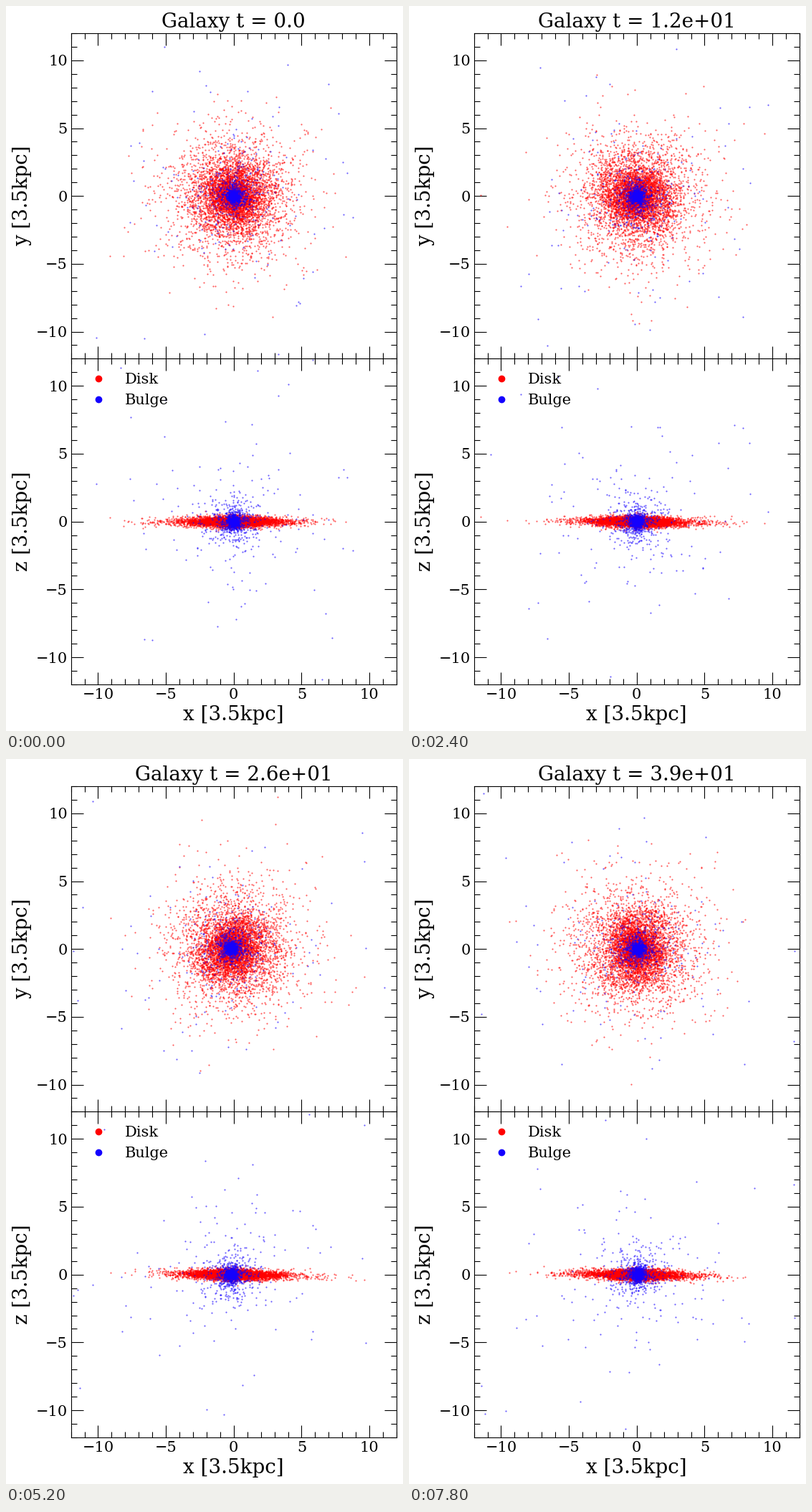
These frames come from a looping animation (554 by 1012 pixels, 8 s). A matplotlib script:

```python
import numpy as np
import matplotlib.pyplot as plt
from matplotlib.animation import FuncAnimation
from matplotlib.ticker import MultipleLocator

W, H, DPI = 554, 1012, 100
LEFT, RIGHT, TOP, MID, BOTTOM = 90.6, 545, 38, 492.4, 947
LIMIT = 12
FRAMES, INTERVAL = 40, 200
RED, BLUE = "#ff0000", "#1400ff"
N_DISK, N_BULGE = 5800, 1600

plt.rcParams.update({
    "font.family": "DejaVu Serif",
    "xtick.labelsize": 15,
    "ytick.labelsize": 15,
    "axes.labelsize": 20,
    "axes.titlesize": 20,
})

rng = np.random.default_rng(12)

# Exponential disk: radius, angle, height and epicycle of every star
disk_r = rng.gamma(2.0, 1.0, N_DISK)
disk_angle = rng.uniform(0, 2 * np.pi, N_DISK)
disk_z = 0.18 * rng.normal(size=N_DISK)
z_phase = rng.uniform(0, 2 * np.pi, N_DISK)
ecc = np.abs(0.12 * rng.normal(size=N_DISK))
epi_phase = rng.uniform(0, 2 * np.pi, N_DISK)
omega = 0.85 / np.sqrt(disk_r**2 + 0.3)
kappa = 1.45 * omega

# Hernquist bulge: every star runs on its own randomly tilted ellipse
root = np.sqrt(rng.uniform(0, 0.99, N_BULGE))
bulge_r = 1.1 * 0.2 * root / (1 - root)
axis_a = rng.normal(size=(N_BULGE, 3))
axis_a /= np.linalg.norm(axis_a, axis=1, keepdims=True)
axis_b = np.cross(axis_a, rng.normal(size=(N_BULGE, 3)))
axis_b /= np.linalg.norm(axis_b, axis=1, keepdims=True)
flat = rng.uniform(0.4, 1, N_BULGE)
bulge_phase = rng.uniform(0, 2 * np.pi, N_BULGE)
bulge_omega = 0.8 / (bulge_r + 0.3)


def sway(t):
    """Slow drift of the centre, growing from rest."""
    grow = min(t / 7, 1)
    swing = 2 * np.pi * (t - 7) / 19
    return -0.18 * grow * np.cos(swing), 0.08 * grow * np.cos(swing + 0.4)


def disk_at(t):
    grow = min(t / 8, 1)
    turn = kappa * t + epi_phase
    r = disk_r * (1 + ecc * np.cos(turn))
    angle = disk_angle + omega * t - 1.38 * ecc * np.sin(turn)
    # Two trailing spiral arms
    arm = 2 * (angle - 0.3 * t + 2 * np.log(disk_r + 0.3))
    strength = grow * np.exp(-((disk_r - 3.2) / 1.2) ** 2)
    angle = angle + 0.15 * strength * np.sin(arm)
    r = r * (1 + 0.07 * strength * np.cos(arm))
    cx, cy = sway(t)
    pull = np.exp(-disk_r / 1.5)
    x = r * np.cos(angle) + cx * pull
    y = r * np.sin(angle) + cy * pull
    z = disk_z * (1 + 0.25 * np.cos(0.6 * t + z_phase)) - 0.015 * grow * x
    return x, y, z


def bulge_at(t):
    turn = bulge_phase + bulge_omega * t
    x, y, z = (bulge_r[:, None] * (np.cos(turn)[:, None] * axis_a
               + (flat * np.sin(turn))[:, None] * axis_b)).T
    cx, cy = sway(t)
    return x + cx, y + cy, z


def panel(top, bottom):
    ax = fig.add_axes([LEFT / W, 1 - bottom / H,
                       (RIGHT - LEFT) / W, (bottom - top) / H])
    ax.set(xlim=(-LIMIT, LIMIT), ylim=(-LIMIT, LIMIT))
    for axis in (ax.xaxis, ax.yaxis):
        axis.set_major_locator(MultipleLocator(5))
        axis.set_minor_locator(MultipleLocator(1))
    ax.tick_params(which="both", direction="in", top=True, right=True, width=0.8)
    ax.tick_params(which="major", length=12)
    ax.tick_params(which="minor", length=6)
    return ax


def stars(ax, color):
    return ax.plot([], [], ".", ms=1, color=color, alpha=0.7)[0]


# The sliver keeps rounding from losing a pixel
fig = plt.figure(figsize=((W + 0.01) / DPI, (H + 0.01) / DPI), dpi=DPI,
                 facecolor="white")
face = panel(TOP, MID)
edge = panel(MID, BOTTOM)
face.tick_params(labelbottom=False)
face.set_ylabel("y [3.5kpc]")
edge.set_ylabel("z [3.5kpc]")
edge.set_xlabel("x [3.5kpc]")
title = face.set_title("")

disk_face, bulge_face = stars(face, RED), stars(face, BLUE)
disk_edge, bulge_edge = stars(edge, RED), stars(edge, BLUE)

for name, color, y in (("Disk", RED, 520.5), ("Bulge", BLUE, 549)):
    fig.add_artist(plt.Line2D([129 / W], [1 - y / H], marker="o", ms=6,
                              color=color, ls="none"))
    fig.text(166 / W, 1 - (y + 6.5) / H, name, fontsize=15, va="baseline")


def update(t):
    x, y, z = disk_at(t)
    disk_face.set_data(x, y)
    disk_edge.set_data(x, z)
    x, y, z = bulge_at(t)
    bulge_face.set_data(x, y)
    bulge_edge.set_data(x, z)
    title.set_text(f"Galaxy t = {float(t):.2}")
    return disk_face, disk_edge, bulge_face, bulge_edge, title


anim = FuncAnimation(fig, update, frames=FRAMES, interval=INTERVAL,
                     init_func=lambda: update(0), repeat=True, repeat_delay=0)
plt.show()
```
